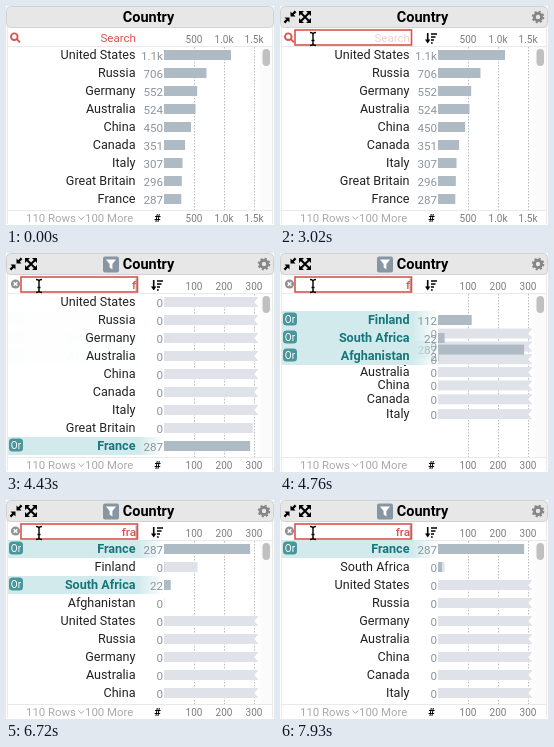
Animation of 268x219 px, one loop 7.99 s. Source, as an HTML page:

```html
<!DOCTYPE html>
<html lang="en">
<head>
<meta charset="utf-8">
<title>Country filter</title>
<style>
  html, body { margin: 0; width: 100%; height: 100%; overflow: hidden; background: #fff; }
  svg { display: block; width: 268px; height: 219px; font-family: Roboto, Arial, sans-serif; }
  .title { font-size: 14.5px; font-weight: 700; }
  .label { font-size: 12.6px; fill: #222; text-anchor: end; }
  .on .label { font-weight: 700; fill: #14777b; }
  .count { font-size: 11.6px; fill: #8b959d; text-anchor: end; }
  .badge, .back { visibility: hidden; }
  .on .badge, .on .back { visibility: visible; }
  .badge text { font-size: 10px; fill: #fff; text-anchor: middle; }
  .axis text { font-size: 10px; fill: #7d7d7d; text-anchor: middle; }
  .axis line { stroke: #bcbcbc; stroke-dasharray: 1.5 1.5; }
  .foot { font-size: 11.4px; fill: #aaa; }
  .query { font-size: 11.6px; fill: #d9534f; text-anchor: end; }
  .query.typed { font-weight: 500; }
  .query.faint { fill: #f1cfcd; }
</style>
</head>
<body>
<svg viewBox="0 0 268 219">
  <defs>
    <clipPath id="list"><rect x="0" y="40" width="254" height="164"/></clipPath>
    <linearGradient id="fade">
      <stop offset="0" stop-color="#d3eaec"/>
      <stop offset="1" stop-color="#d3eaec" stop-opacity="0"/>
    </linearGradient>
  </defs>
  <rect width="268" height="219" fill="#fff"/>
  <path d="M1.5 20V218M266.5 20V218M1 40.5H266M1 204.5H266" stroke="#e9e9e9" fill="none"/>
  <rect x=".5" y=".5" width="267" height="21" rx="4" fill="#e7e7e7" stroke="#d2d2d2"/>
  <text class="title" x="142.5" y="16" text-anchor="middle">Country</text>

  <g id="filter">
    <rect x="97" y="3.5" width="16" height="16" rx="2" fill="#8796a3"/>
    <path d="M100 6.5H110L106.4 11V16.5L103.6 14.5V11Z" fill="#fff"/>
  </g>

  <g id="tools">
    <path d="M10.5 10.5V5.5L12.2 7.2L14.8 4.6L16.4 6.2L13.8 8.8L15.5 10.5ZM9.5 11.5V16.5L7.8 14.8L5.2 17.4L3.6 15.8L6.2 13.2L4.5 11.5Z"/>
    <path d="M21 7L29 15M29 7L21 15" stroke="#000" stroke-width="2"/>
    <path d="M19 5H24L19 10ZM31 5V10L26 5ZM19 17V12L24 17ZM31 17H26L31 12Z"/>
    <circle cx="258" cy="11" r="3.6" fill="none" stroke="#858585" stroke-width="2.8"/>
    <circle cx="258" cy="11" r="5.4" fill="none" stroke="#858585" stroke-width="1.8" stroke-dasharray="2.12 2.12"/>
    <path d="M145 33.5H150.4L147.7 37.5Z"/>
    <path d="M147.7 27V35M151 28H157M151 31H155.5M151 34H154M151 37H152.7" stroke="#000" stroke-width="1.6"/>
  </g>

  <g id="lens" fill="none" stroke="#d9534f" stroke-width="1.9">
    <circle cx="8.3" cy="30.7" r="3.3"/>
    <path d="M10.8 33.2L14 36.4"/>
  </g>
  <g id="clear">
    <circle cx="9.5" cy="31" r="4.6" fill="#919191"/>
    <path d="M7.7 29.2L11.3 32.8M11.3 29.2L7.7 32.8" stroke="#fff" stroke-width="1.4"/>
  </g>
  <rect id="box" x="15" y="24" width="116.5" height="15" fill="#fff" stroke="#d9534f" stroke-width="1.6"/>
  <text id="query" x="130" y="36"></text>
  <path id="caret" d="M130.2 25.5V38" stroke="#a05a58" stroke-width=".8"/>

  <g id="axis" class="axis"></g>
  <g id="rows" clip-path="url(#list)"></g>

  <rect x="254" y="41" width="12" height="163" fill="#fbfbfb"/>
  <rect x="256.5" y="43" width="7.5" height="17" rx="3.7" fill="#c0c0c0"/>

  <text class="foot" x="20" y="216">110 Rows</text>
  <path d="M72.5 210.5L75.3 213.5L78 210.5" fill="none" stroke="#aaa"/>
  <text class="foot" x="79" y="216">100 More</text>
  <text x="151.5" y="216" font-size="11" font-weight="700" text-anchor="middle">#</text>

  <path id="arrow" d="M0 0V12L2.8 9.5L4.6 13.6L6.4 12.8L4.6 8.8H8.4Z" stroke="#fff" stroke-width=".8"/>
  <path id="beam" d="M-3 -6.5Q0 -6.5 0 -4.5Q0 -6.5 3 -6.5M0 -5V5M-3 6.5Q0 6.5 0 4.5Q0 6.5 3 6.5M-1.5 1.5H1.5" fill="none" stroke="#000" stroke-width="1.4"/>
</svg>
<script>
const LOOP = 7990, X0 = 158, CAP = 92.5, SORT_TIME = 660, STAGGER = 21;
const HOVER = 720, FOCUS = 1590, FILTER = 3670, SORT_1 = 4503, NARROW = 6110, SORT_2 = 7035, LAST = 7760;
const NEVER = Infinity;
const $ = id => document.getElementById(id);
const lerp = (a, b, p) => a + (b - a) * p;
const ramp = (t, start, length) => Math.min(1, Math.max(0, (t - start) / length));

// The standard CSS "ease" curve, cubic-bezier(.25, .1, .25, 1).
function ease(x) {
  if (x <= 0 || x >= 1) return x <= 0 ? 0 : 1;
  let lo = 0, hi = 1;
  const curve = (s, a, b) => 3 * a * s * (1 - s) ** 2 + 3 * b * s * s * (1 - s) + s ** 3;
  for (let i = 0; i < 22; i++) {
    const mid = (lo + hi) / 2;
    if (curve(mid, .25, .25) < x) lo = mid; else hi = mid;
  }
  return curve(lo, .1, 1);
}

function add(parent, tag, attrs = {}, text = '') {
  const el = document.createElementNS('http://www.w3.org/2000/svg', tag);
  for (const key in attrs) el.setAttribute(key, attrs[key]);
  el.textContent = text;
  return parent.appendChild(el);
}
const show = (el, visible) => el.setAttribute('opacity', +visible);
const move = (el, x, y) => el.setAttribute('transform', `translate(${x} ${y})`);

// slots: list position at the start, after the first sort, after the second
const rows = [
  ['United States', 1117], ['Russia', 706], ['Germany', 552], ['Australia', 524],
  ['China', 450], ['Canada', 351], ['Italy', 307], ['Great Britain', 296]
].map(([name, total], i) => ({ name, total, slots: [i, i + 4, i + 2], off: FILTER }));
rows[7].leave = 4430;
rows.push(
  { name: 'France', total: 287, slots: [8, 0, 0], off: NEVER },
  { name: 'Finland', total: 112, slots: [1, 1, 1], off: NARROW, enter: 4430, leave: 6960 },
  { name: 'South Africa', total: 22, slots: [2, 2, 1], off: LAST, enter: 4430 },
  { name: 'Afghanistan', total: 2, slots: [3, 3, 3], off: NARROW, enter: 4430, leave: 6960 }
);

for (const row of rows) {
  const g = row.el = add($('rows'), 'g');
  add(g, 'rect', { class: 'back', x: 2, y: 0, width: 131, height: 18, fill: '#d3eaec' });
  add(g, 'rect', { class: 'back', x: 133, y: 0, width: 25, height: 18, fill: 'url(#fade)' });
  const badge = add(g, 'g', { class: 'badge' });
  add(badge, 'rect', { x: 3, y: 1.5, width: 14, height: 13, rx: 3.5, fill: '#4a969b' });
  add(badge, 'text', { x: 10, y: 11.5 }, 'Or');
  add(g, 'text', { class: 'label', x: 129.5, y: 13 }, row.name);
  row.count = add(g, 'text', { class: 'count', x: 157, y: 13.5 });
  row.ghost = add(g, 'rect', { x: X0, y: 4, height: 10, fill: '#dfe3e9' });
  row.bar = add(g, 'rect', { x: X0, y: 4, height: 10, fill: '#afbbc4' });
  row.clamp = add(g, 'g');
  if (row.total > 300) {
    add(row.clamp, 'rect', { x: 247.5, y: 4, width: 4.5, height: 10, fill: '#dfe3e9' });
    add(row.clamp, 'path', { d: 'M252.3 4.5V13.5L248.3 9Z', fill: '#fff' });
  }
}

function makeAxis(names) {
  const g = add($('axis'), 'g');
  const ticks = names.map(name => {
    const tick = add(g, 'g');
    add(tick, 'line', { x1: 0, x2: 0, y1: 41, y2: 204 });
    add(tick, 'text', { x: -.5, y: 36.5 }, name);
    add(tick, 'text', { x: -.5, y: 215.5 }, name);
    return tick;
  });
  return { g, place: step => ticks.forEach((tick, i) => move(tick, X0 + .5 + (i + 1) * step, 0)) };
}
const wide = makeAxis(['500', '1.0k', '1.5k']);
const fine = makeAxis(['100', '200', '300']);
wide.place(30);

function drawRow(row, t) {
  const [a, b, c] = row.slots;
  const first = ease(ramp(t, SORT_1 + STAGGER * b, SORT_TIME));
  const second = ease(ramp(t, SORT_2 + STAGGER * c, SORT_TIME));
  move(row.el, 0, 40 + 18 * lerp(lerp(a, b, first), c, second));

  const enter = row.enter ? ramp(t, row.enter, 80) : 1;
  const leave = row.leave ? ramp(t, row.leave, 80) : 0;
  show(row.el, enter * (1 - leave));

  const matched = t < row.off;
  row.el.setAttribute('class', matched && t >= FILTER ? 'on' : '');
  row.count.textContent = !matched ? 0 : row.total > 999 ? '1.1k' : row.total;

  const before = row.total * .06, after = Math.min(CAP, row.total * .3);
  const width = lerp(before, after, ease(ramp(t, FILTER + 20, 700)));
  const start = row.off === FILTER ? before : width;
  const delay = row.off === FILTER ? 20 : 0;
  row.ghost.setAttribute('width', width);
  row.bar.setAttribute('width', start * (1 - ease(ramp(t, row.off + delay, 700))));
  show(row.clamp, t >= FILTER);
}

function drawSearch(t) {
  const typed = t < 3610 ? '' : t < 5080 ? 'f' : t < NARROW ? 'fr' : 'fra';
  const focused = t >= FOCUS;
  $('query').textContent = typed || 'Search';
  $('query').setAttribute('class', 'query ' + (typed ? 'typed' : focused ? 'faint' : ''));
  show($('box'), focused);
  show($('lens'), !typed);
  show($('clear'), typed !== '');
  const hidden = [[0, FOCUS], [2060, 2540], [3020, 3610], [5580, NARROW], [7100, 7580]];
  show($('caret'), !hidden.some(([from, to]) => t >= from && t < to));
}

function drawPointer(t) {
  const p = ease(ramp(t, HOVER, 690));
  const x = lerp(-10, 33, p), y = lerp(44, 33, p);
  const text = x > 14;
  show($('arrow'), t >= HOVER && !text);
  show($('beam'), text);
  move($('arrow'), x, y);
  move($('beam'), x, y);
}

function draw(t) {
  show($('tools'), ramp(t, HOVER, 400));
  show($('filter'), ramp(t, 3610, 120));
  drawSearch(t);
  drawPointer(t);
  const p = ease(ramp(t, FILTER + 20, 560));
  show(wide.g, t < FILTER);
  show(fine.g, t < FILTER ? 0 : Math.min(1, p * 2));
  fine.place(lerp(6, 30, p));
  rows.forEach(row => drawRow(row, t));
}

const begin = performance.now();
function tick() {
  draw((performance.now() - begin) % LOOP);
  requestAnimationFrame(tick);
}
tick();
</script>
</body>
</html>
```
